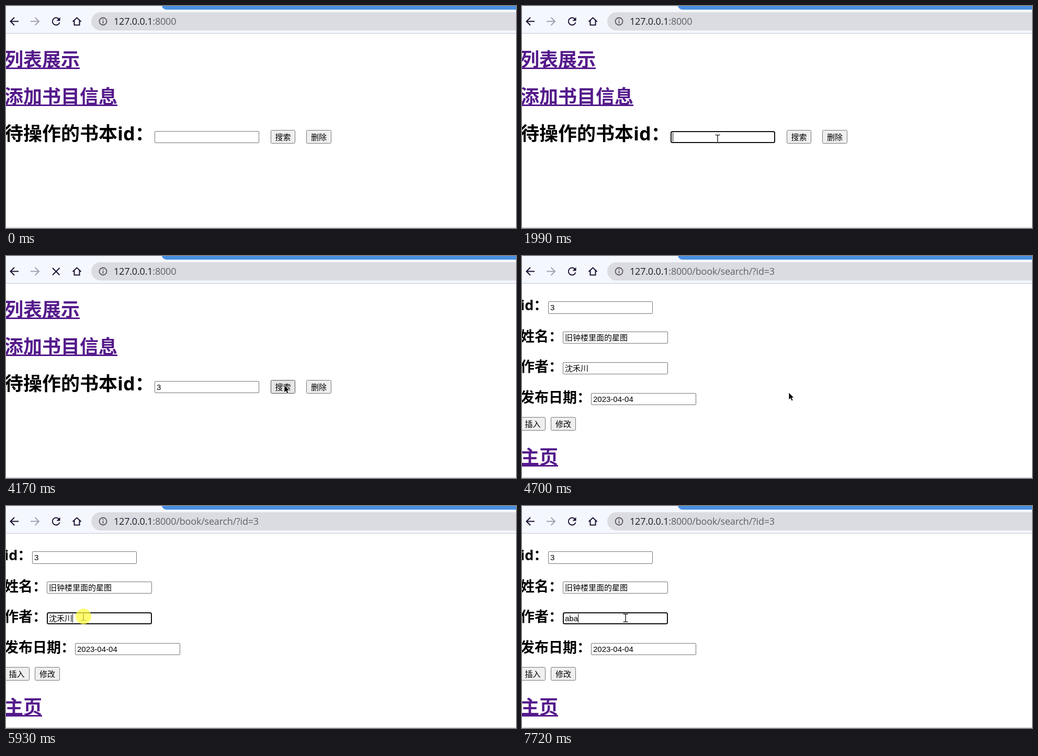
These frames come from a looping animation (975x426 px, 8 s). An HTML page:

```html
<!DOCTYPE html>
<html lang="zh-CN">
<head>
<meta charset="utf-8">
<title>书目管理</title>
<style>
  html, body { margin: 0; width: 100%; height: 100%; overflow: hidden; background: #fff; }
  svg { display: block; width: 975px; height: 426px; }
  text { white-space: pre; }
  .head { font-family: "Open Sans", "Noto Sans CJK SC", "Noto Sans CJK", sans-serif; font-weight: 700; }
  .form { font: 15px "Liberation Sans", "Noto Sans CJK SC", "Noto Sans CJK", sans-serif; }
  .url { font: 18px "Open Sans", sans-serif; letter-spacing: -.2px; fill: #606069; }
  .icon { fill: none; stroke: #1a1033; stroke-width: 2; }
</style>
</head>
<body>
<svg id="stage" viewBox="0 0 975 426">
  <rect width="975" height="426" fill="#fff"/>
  <rect width="975" height="52" fill="#f4f7fd"/>
  <path d="M298 0H975V7H307Q300 7 298 0Z" fill="#4a90e2"/>
  <rect y="52" width="975" height="1" fill="#c3c8d4"/>
  <rect x="163" y="12" width="840" height="35" rx="17.5" fill="#dbdce1"/>
  <g class="icon">
    <path d="M24 29.5H9M16 22L8.500 29.500L16 37"/>
    <path d="M47 29.500H62M55.500 22L63 29.500L55.500 37" stroke="#a09fb0"/>
    <g id="reload">
      <path d="M101.500 25.500A7 7 0 1 0 102.500 31.500"/>
      <path d="M103.500 21.500V28.500H96.500Z" fill="#1a1033" stroke="none"/>
    </g>
    <path id="stop" d="M89 23L102.500 36.500M102.500 23L89 36.500"/>
    <path d="M127.500 30L135.500 22.500L143.500 30M130.500 28V36.500H140.500V28"/>
    <g stroke="#5c5563" stroke-width="1.800">
      <circle cx="185.500" cy="29.500" r="7"/>
      <path d="M185.500 28.500V33.500M185.500 25.300V27"/>
    </g>
  </g>
  <text class="url" x="206" y="36"><tspan fill="#1f1b2d">127.0.0.1</tspan><tspan>:8000</tspan><tspan id="path"></tspan></text>
  <g id="home"></g>
  <g id="detail"></g>
  <rect y="425" width="975" height="1" fill="#c4c5cf"/>
  <g id="pointer">
    <path id="beam" d="M-4.500 -7.500H-1.500Q0 -7.500 0 -6Q0 -7.500 1.500 -7.500H4.500M0 -6V6M-4.500 7.500H-1.500Q0 7.500 0 6Q0 7.500 1.500 7.500H4.500"
      fill="none" stroke="#2b2b2b" stroke-width="1.500"/>
    <path id="arrow" d="M0 0V14L3.300 11L5.500 16L8 15L5.900 10H10Z" fill="#000" stroke="#fff" stroke-width=".8"/>
  </g>
  <circle id="halo" r="15" fill="#fffb3c" opacity=".72"/>
</svg>
<script>
const LOOP = 8000, BLINK = 530, LOAD = 4240, PRESS = 4110;
const $ = id => document.getElementById(id);
const show = (el, on) => el.setAttribute('display', on ? 'inline' : 'none');

function add(parent, tag, attrs, content = '') {
  const el = document.createElementNS('http://www.w3.org/2000/svg', tag);
  for (const key in attrs) el.setAttribute(key, attrs[key]);
  el.textContent = content;
  return parent.appendChild(el);
}

function heading(page, y, size, content) {
  return add(page, 'text', { class: 'head', x: -3, y, 'font-size': size }, content);
}

function link(page, y, content) {
  heading(page, y, 36, content).setAttribute('fill', '#551a8b');
  add(page, 'rect', { y: y + 2, width: content.length * 36 - 3, height: 3, fill: '#551a8b' });
}

function field(page, x, y, w, h, value = '') {
  const box = add(page, 'rect', { fill: '#fff' });
  const text = add(page, 'text', { class: 'form', x: x + 4, y: y + 17 }, value);
  const caret = add(page, 'rect', { y: y + 3, width: 1, height: 17, display: 'none' });
  const focus = on => {
    const line = on ? 2 : 1;
    const attrs = {
      x: x + line / 2, y: y + line / 2, width: w - line, height: h - line,
      rx: on ? 2.5 : 1.5, stroke: on ? '#101010' : '#767676', 'stroke-width': line
    };
    for (const key in attrs) box.setAttribute(key, attrs[key]);
  };
  focus(false);
  return { x: x + 4, text, caret, focus };
}

function button(page, x, y, w, label) {
  const box = add(page, 'rect', {
    x: x + .5, y: y + .5, width: w - 1, height: 25, rx: 2, fill: '#efefef', stroke: '#767676'
  });
  add(page, 'text', { class: 'form', x: x + w / 2, y: y + 19, 'text-anchor': 'middle' }, label);
  return box;
}

const home = $('home'), detail = $('detail');
const author = '沈禾川';

link(home, 116, '列表展示');
link(home, 187, '添加书目信息');
heading(home, 258, 36, '待操作的书本id：');
const idField = field(home, 284, 240, 200, 23);
const search = button(home, 506, 238, 47, '搜索');
button(home, 574, 238, 48, '删除');

heading(detail, 104, 27, 'id：');
heading(detail, 164, 27, '姓名：');
heading(detail, 222, 27, '作者：');
heading(detail, 281, 27, '发布日期：');
field(detail, 50, 87, 200, 24, '3');
field(detail, 78, 145, 201, 23, '旧钟楼里面的星图');
const authorField = field(detail, 78, 204, 201, 23, author);
field(detail, 132, 263, 201, 23, '2023-04-04');
button(detail, -4, 309, 49, '插入');
button(detail, 55, 309, 48, '修改');
link(detail, 399, '主页');

// Each edit: time, resulting text. The first one also takes focus.
const idEdits = [[930, ''], [2650, '3']];
const authorEdits = [
  [5930, author], [6600, author.slice(0, 2)], [6800, author.slice(0, 1)],
  [7000, ''], [7270, 'a'], [7600, 'ab'], [7720, 'aba']
];

// Pointer moves: start, end, steps, waypoints evenly spaced in time.
const moves = [
  [330, 930, 9, [[845, 418], [720, 390], [620, 364], [425, 300], [374, 255]]],
  [3070, 3850, 12, [[378, 256], [453, 267], [515, 275], [550, 272], [532, 248]]],
  [4700, 5390, 10, [[510, 262], [375, 250], [125, 245], [62, 225], [87, 213], [143, 212]]],
  [5520, 5730, 3, [[144, 213], [148, 212]]],
  [6000, 6140, 2, [[165, 213], [198, 215]]]
];
const clicks = [[930, 1130], [PRESS, 4170], [5930, 6070]];
const within = (t, [from, to]) => t >= from && t < to;

function pointerAt(t) {
  const move = moves.filter(m => t >= m[0]).pop();
  if (!move) return null;
  const [start, end, steps, points] = move;
  const u = Math.min(1, Math.floor((t - start) / (end - start) * steps + 1e-6) / steps);
  const pos = u * (points.length - 1);
  const i = Math.min(points.length - 2, Math.floor(pos + 1e-6));
  const mix = k => points[i][k] + (points[i + 1][k] - points[i][k]) * (pos - i);
  return [mix(0), mix(1)];
}

function edit(target, edits, blur, initial, t) {
  const last = edits.filter(e => t >= e[0]).pop();
  const focused = !!last && t < blur;
  const value = last ? last[1] : initial;
  if (target.text.textContent !== value) target.text.textContent = value;
  target.focus(focused);
  const lit = focused && Math.floor((t - last[0]) / BLINK) % 2 === 0;
  show(target.caret, lit);
  if (lit) {
    const width = value ? target.text.getComputedTextLength() : 0;
    target.caret.setAttribute('x', Math.round(target.x + width));
  }
}

function draw(t) {
  const loaded = t >= LOAD;
  const loading = within(t, [4170, LOAD]);
  show(home, !loaded);
  show(detail, loaded);
  show($('stop'), loading);
  show($('reload'), !loading);
  $('path').textContent = loaded ? '/book/search/?id=3' : '';

  if (loaded) edit(authorField, authorEdits, LOOP, author, t);
  else edit(idField, idEdits, PRESS, '', t);

  const hover = t >= 3780;
  search.setAttribute('fill', within(t, [PRESS, 4170]) ? '#f5f5f5' : hover ? '#e5e5e5' : '#efefef');
  search.setAttribute('stroke', hover ? '#4f4f4f' : '#767676');

  const at = pointerAt(t);
  show($('pointer'), at);
  show($('halo'), at && clicks.some(c => within(t, c)));
  if (!at) return;
  const [x, y] = at;
  const beam = loaded ? x < 280 && y < 230 : x < 490 && y < 275;
  show($('beam'), beam);
  show($('arrow'), !beam);
  for (const id of ['pointer', 'halo']) $(id).setAttribute('transform', `translate(${x} ${y})`);
}

const begin = performance.now();
function tick() {
  draw((performance.now() - begin) % LOOP);
  requestAnimationFrame(tick);
}
tick();
</script>
</body>
</html>
```
